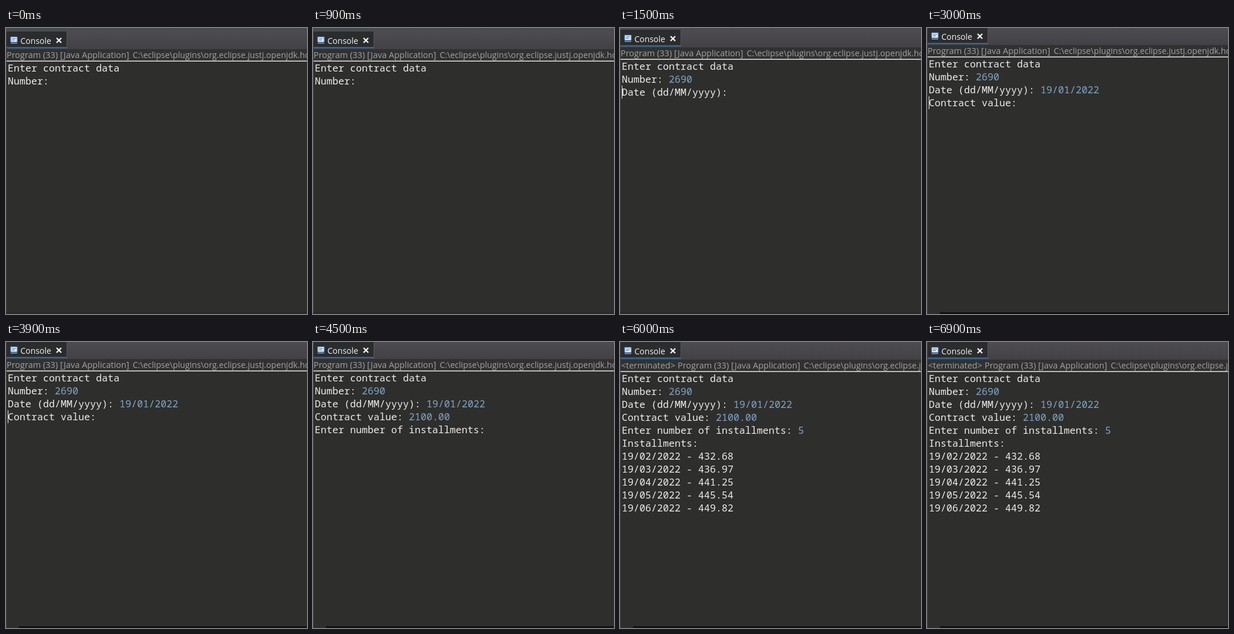
An HTML page for the animation above (7.5 s loop, 512 by 486 pixels).

```html
<!DOCTYPE html>
<html lang="en">
<head>
<meta charset="utf-8">
<title>Console session</title>
<style>
  html, body { margin: 0; width: 100%; height: 100%; overflow: hidden; background: #2e2f2d; }
  svg { display: block; width: 512px; height: 486px; }
  text { white-space: pre; }
  .ui { font-family: "Open Sans", "Noto Sans", sans-serif; }
  .tab { font-size: 14px; fill: #f4f4f4; }
  .info { font-size: 14.5px; fill: #a3a3a3; }
  .path { font-size: 14.15px; }
  .line { font: 16.667px "Noto Sans Mono", monospace; fill: #ececea; }
  .input { fill: #83a5c8; }
</style>
</head>
<body>
<svg viewBox="0 0 512 486">
  <defs>
    <linearGradient id="bar" x1="0" y1="0" x2="0" y2="1">
      <stop offset="0" stop-color="#4d4c50"/>
      <stop offset="1" stop-color="#434145"/>
    </linearGradient>
  </defs>
  <rect width="512" height="486" fill="#2e2f2d"/>
  <rect width="1" height="486" fill="#49494b"/>
  <g id="panel">
    <rect y="-4" width="512" height="10" fill="#484c4e"/>
    <rect y="6" width="512" height="30" fill="url(#bar)"/>
    <rect x="1" y="6" width="102" height="29" fill="#2b2c2d"/>
    <rect x="103" y="6" width="1" height="29" fill="#57565a"/>
    <rect x="1" y="32.5" width="102" height="2" fill="#3b74ae"/>
    <g>
      <rect x="7" y="14.5" width="13" height="10" rx="1" fill="#3d6fae"/>
      <rect x="8.5" y="15.5" width="10" height="8" fill="#e9f0f8"/>
      <path d="M10 18h7M10 20.5h5" stroke="#3f67a0"/>
      <rect x="8" y="25" width="11" height="1.5" fill="#7ba2cf"/>
    </g>
    <text class="ui tab" x="24.5" y="27">Console</text>
    <path d="M86 17l8 8M94 17l-8 8" stroke="#f4f4f4" stroke-width="2.4"/>
    <rect x="1" y="36" width="511" height="19" fill="#303130"/>
    <g id="info"></g>
    <rect x="1" y="55.5" width="511" height="1.5" fill="#e6e6e6"/>
    <g id="output"></g>
    <rect id="caret" x="3" width="1" height="22" fill="#f0f0f0"/>
  </g>
  <rect id="foot" height="3" y="483"/>
</svg>
<script>
const STEP = 1500;
const CHAR = 10, PITCH = 22, LEFT = 3, BASE = 74;

// Each entry: prompt and the reply typed after it
const log = [
  ["Enter contract data"],
  ["Number: ", "2690"],
  ["Date (dd/MM/yyyy): ", "19/01/2022"],
  ["Contract value: ", "2100.00"],
  ["Enter number of installments: ", "5"],
  ["Installments:"],
  ["19/02/2022 - 432.68"],
  ["19/03/2022 - 436.97"],
  ["19/04/2022 - 441.25"],
  ["19/05/2022 - 445.54"],
  ["19/06/2022 - 449.82"]
];

const steps = [
  { shift: 0, lines: 2 },
  { shift: -3, lines: 3, caret: true },
  { shift: -7, lines: 4, caret: true, scrolled: true },
  { shift: -7, lines: 5, scrolled: true },
  { shift: -6, lines: 11, scrolled: true, done: true }
];

const $ = id => document.getElementById(id);

function addText(parent, x, y, cls, content) {
  const node = document.createElementNS("http://www.w3.org/2000/svg", "text");
  node.setAttribute("x", x);
  node.setAttribute("y", y);
  node.setAttribute("class", cls);
  node.textContent = content;
  parent.append(node);
}

function drawInfo(done) {
  const info = $("info"), x = done ? 98 : 1;
  info.replaceChildren();
  if (done) addText(info, 2, 51, "ui info", "<terminated>");
  addText(info, x, 51, "ui info", "Program (33) [Java Application]");
  addText(info, x + 214.5, 51, "ui info path",
    "C:\\eclipse\\plugins\\org.eclipse.justj.openjdk.hotspot");
}

function drawLog(count) {
  const output = $("output");
  output.replaceChildren();
  log.slice(0, count).forEach(([prompt, reply], i) => {
    const y = BASE + i * PITCH;
    addText(output, LEFT, y, "line", prompt);
    if (reply && i < count - 1)
      addText(output, LEFT + prompt.length * CHAR, y, "line input", reply);
  });
}

function draw(step) {
  $("panel").setAttribute("transform", `translate(0 ${step.shift})`);
  drawInfo(step.done);
  drawLog(step.lines);
  const caret = $("caret"), foot = $("foot");
  caret.setAttribute("y", BASE - 17 + (step.lines - 1) * PITCH);
  caret.setAttribute("visibility", step.caret ? "visible" : "hidden");
  const footX = step.scrolled ? 22 : 0;
  foot.setAttribute("x", footX);
  foot.setAttribute("width", 512 - footX);
  foot.setAttribute("fill", step.scrolled ? "#101011" : "#29282a");
}

const start = performance.now();
let shown = -1;

function tick() {
  const index = Math.floor((performance.now() - start) / STEP) % steps.length;
  if (index !== shown) draw(steps[shown = index]);
  requestAnimationFrame(tick);
}
tick();
</script>
</body>
</html>
```
